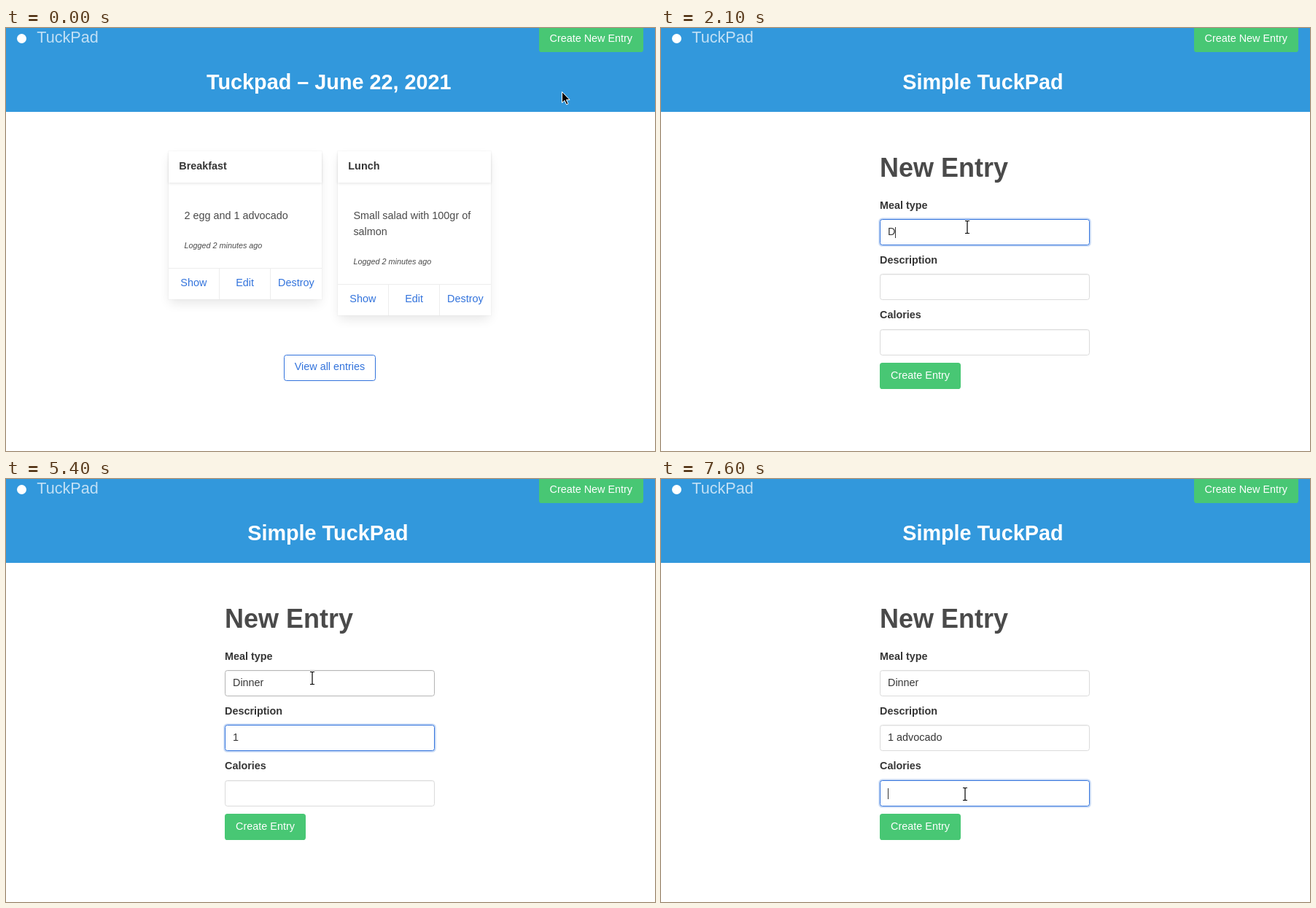
Recreate the animation shown at these times as an HTML page. Size 890x580 px, loop 8 s.

```html
<!DOCTYPE html>
<html lang="en">
<head>
<meta charset="utf-8">
<title>Meal diary</title>
<style>
html, body { margin: 0; width: 100%; height: 100%; overflow: hidden; background: #fff; }
#stage { position: absolute; left: 0; top: 0; width: 890px; height: 580px; overflow: hidden; }
#stage div { position: absolute; box-sizing: border-box; }
#stage .page { left: 0; top: 0; }
svg { position: absolute; left: 0; top: 0; }
text { font: 14.4px "Liberation Sans", Arial, sans-serif; fill: #4a4a4a; white-space: pre; }
.mid { text-anchor: middle; }
.end { text-anchor: end; }
.white { fill: #fff; }
.link { fill: #3273dc; }
.value { fill: #363636; }
.brand { font-size: 21.6px; fill: rgba(255,255,255,.7); }
.title { font-size: 28.8px; font-weight: bold; fill: #fff; }
.h1 { font-size: 36px; font-weight: bold; }
.label { font-weight: bold; fill: #363636; }
.note { font-size: 10.8px; font-style: italic; }
.option { font: 13.333px "DejaVu Sans", sans-serif; fill: #5b5b60; }
.bar { background: #3298dc; }
.button { background: #48c774; border-radius: 3.6px; }
.button.hover { background: #3ec46d; }
.button.focus { box-shadow: 0 0 0 1.8px rgba(72,199,116,.5); }
.outline { border: 1px solid #3273dc; border-radius: 3.6px; }
.card { background: #fff; box-shadow: 0 7.2px 14.4px -1.8px rgba(10,10,10,.1), 0 0 0 1px rgba(10,10,10,.02); }
.head { box-shadow: 0 1.8px 3.6px rgba(10,10,10,.1); }
.rule { background: #ededed; }
.input { background: #fff; border: 1px solid #dbdbdb; border-radius: 3.6px; box-shadow: inset 0 .9px 1.8px rgba(10,10,10,.05); }
.input.hover { border-color: #b5b5b5; }
.input.focus { border-color: #3273dc; box-shadow: 0 0 0 1.8px rgba(50,115,220,.25); }
</style>
</head>
<body>
<div id="stage"></div>
<script>
const LOOP = 8000;
const NS = "http://www.w3.org/2000/svg";
const stage = document.getElementById("stage");

function node(parent, tag, attrs, content) {
  const n = document.createElementNS(NS, tag);
  for (const k in attrs) n.setAttribute(k, attrs[k]);
  if (content) n.textContent = content;
  parent.appendChild(n);
  return n;
}
function box(parent, cls, x, y, w, h) {
  const d = document.createElement("div");
  d.className = cls;
  d.style.cssText = `left:${x}px;top:${y}px;width:${w}px;height:${h}px`;
  parent.appendChild(d);
  return d;
}
const layer = parent => node(parent, "svg", { width: 890, height: 580 });
const label = (parent, cls, x, y, str) => node(parent, "text", { class: cls, x, y }, str);
const show = (n, on) => { n.style.display = on ? "" : "none"; };

// Shared header
box(stage, "bar", 0, 0, 890, 115);
const newButton = box(stage, "button", 731, -3, 143, 36);
const top_ = layer(stage);
node(top_, "circle", { cx: 21.5, cy: 14.5, r: 6.5, fill: "#fff" });
label(top_, "brand", 42.3, 20, "TuckPad");
label(top_, "white mid", 802.3, 19, "Create New Entry");

// Overview page
const list = box(stage, "page", 0, 0, 890, 580);
function card(x, h, name, lines) {
  const foot = 169 + h - 43;
  box(list, "card", x, 169, 210, h);
  box(list, "head", x, 169, 210, 43);
  box(list, "rule", x, foot, 210, 1);
  for (const dx of [69, 139]) box(list, "rule", x + dx, foot, 1, 43);
  return svg => {
    label(svg, "label", x + 14.3, 194, name);
    lines.forEach((s, i) => label(svg, "", x + 21.4, 262 + i * 22, s));
    label(svg, "note", x + 21.5, foot - 27, "Logged 2 minutes ago");
    ["Show", "Edit", "Destroy"].forEach((s, i) =>
      label(svg, "link mid", x + 34.3 + i * 70.3, foot + 25, s));
  };
}
const cards = [
  card(223, 203, "Breakfast", ["2 egg and 1 advocado"]),
  card(455, 225, "Lunch", ["Small salad with 100gr of", "salmon"])
];
box(list, "outline", 381, 448, 126, 36);
const listText = layer(list);
cards.forEach(fill => fill(listText));
label(listText, "title end", 391.3, 84, "Tuckpad");
label(listText, "title", 399.3, 84, "– June 22, 2021");
label(listText, "link mid", 444, 469, "View all entries");

// Form page
const form = box(stage, "page", 0, 0, 890, 580);
const tops = [262, 337, 413];
const inputs = tops.map(y => box(form, "input", 300, y, 288, 36));
box(form, "button", 300, 459, 111, 36);
const formText = layer(form);
label(formText, "title", 331.2, 84, "Simple TuckPad");
label(formText, "h1", 300, 204, "New Entry");
["Meal type", "Description", "Calories"].forEach((s, i) => label(formText, "label", 300, 248 + i * 75, s));
label(formText, "white mid", 355.5, 481, "Create Entry");
const values = tops.map(y => label(formText, "value", 311, y + 22, ""));
const caret = node(formText, "rect", { width: 1, height: 15, fill: "#363636" });

const popup = node(formText, "g", {});
const frame = node(popup, "rect", { x: 300.5, y: 372.5, width: 286, height: 23, fill: "#fff", stroke: "#d6d6d6" });
label(popup, "option", 307, 389, "2 egg and 1 advocado");
const second = label(popup, "option", 307, 409, "Small salad with 100gr of salmon");

// Pointers
const overlay = layer(stage);
const ink = { fill: "#000", stroke: "#fff", "stroke-width": 1, "stroke-linejoin": "round" };
const pointers = {
  arrow: node(overlay, "path", { ...ink, d: "M.5 .5V15.5L4 12.3L6.7 18L9 17L6.4 11.4H11Z" }),
  hand: node(overlay, "path", { ...ink, d: "M-1.5 1Q0 -1 1.5 1V7L7 8.5Q9 9 8.5 11L7 17H-1L-5.5 10.5Q-5 8.5 -3 10L-1.5 11Z" }),
  beam: node(overlay, "g", {})
};
const stem = "M-3 -8.5H-1Q0 -8.5 0 -7.5Q0 -8.5 1 -8.5H3M0 -8V8M-3 8.5H-1Q0 8.5 0 7.5Q0 8.5 1 8.5H3";
for (const [stroke, w] of [["#fff", 2.6], ["#000", 1.2]])
  node(pointers.beam, "path", { d: stem, fill: "none", stroke, "stroke-width": w });

// Timeline: [start, ...state]
const moves = [
  [0, 762, 87, "arrow"], [300, 768, 74, "arrow"], [400, 780, 46, "arrow"],
  [500, 787, 20, "hand"], [600, 786, 17, "hand"], [700, 738, 38, "hand"],
  [800, 645, 67, "arrow"], [900, 590, 104, "arrow"], [1000, 545, 136, "arrow"],
  [1100, 496, 173, "arrow"], [1200, 428, 225, "arrow"], [1300, 420, 258, "arrow"],
  [1400, 420, 273, "beam"], [5700, 419, 272, "arrow"], [7000, 420, 290, "arrow"],
  [7100, 421, 336, "arrow"], [7200, 422, 394, "arrow"], [7300, 421, 440, "arrow"],
  [7400, 419, 452, "arrow"], [7500, 417, 437, "beam"], [7600, 417, 432, "beam"]
];
const focus = [[0, -1], [1500, 0], [3000, 1], [7500, -1], [7600, 2]];
const blinks = [[4200, 4400], [5400, 5600], [6600, 7600]];
const typing = [
  ["Dinner", [2100, 2300, 2400, 2600, 2700, 2800]],
  ["1 advocado", [4400, 4700, 5600, 5700, 5900, 6000, 6100, 6200, 6300, 6400]],
  ["", []]
];
const within = (t, a, b) => t >= a && t < b;
const state = (rows, t) => rows.filter(r => r[0] <= t).pop();

function draw(t) {
  const onForm = t >= 1000;
  show(list, !onForm);
  show(form, onForm);
  newButton.classList.toggle("hover", within(t, 500, 700));
  newButton.classList.toggle("focus", within(t, 600, 1000));

  const active = state(focus, t)[1];
  inputs.forEach((n, i) => n.classList.toggle("focus", i === active));
  inputs[0].classList.toggle("hover", within(t, 1400, 7500) && active !== 0);
  typing.forEach(([str, times], i) => {
    values[i].textContent = str.slice(0, times.filter(k => k <= t).length);
  });

  const lit = active >= 0 && !blinks.some(b => within(t, ...b));
  show(caret, lit);
  if (lit) {
    caret.setAttribute("x", 311 + Math.floor(values[active].getComputedTextLength()));
    caret.setAttribute("y", tops[active] + 11);
  }

  const two = t < 5900;
  show(popup, within(t, 5700, 7500));
  show(second, two);
  frame.setAttribute("height", two ? 43 : 23);

  const [, x, y, kind] = state(moves, t);
  for (const k in pointers) show(pointers[k], k === kind);
  pointers[kind].setAttribute("transform", `translate(${x} ${y})`);
}

function tick() {
  draw(performance.now() % LOOP);
  requestAnimationFrame(tick);
}
tick();
</script>
</body>
</html>
```
